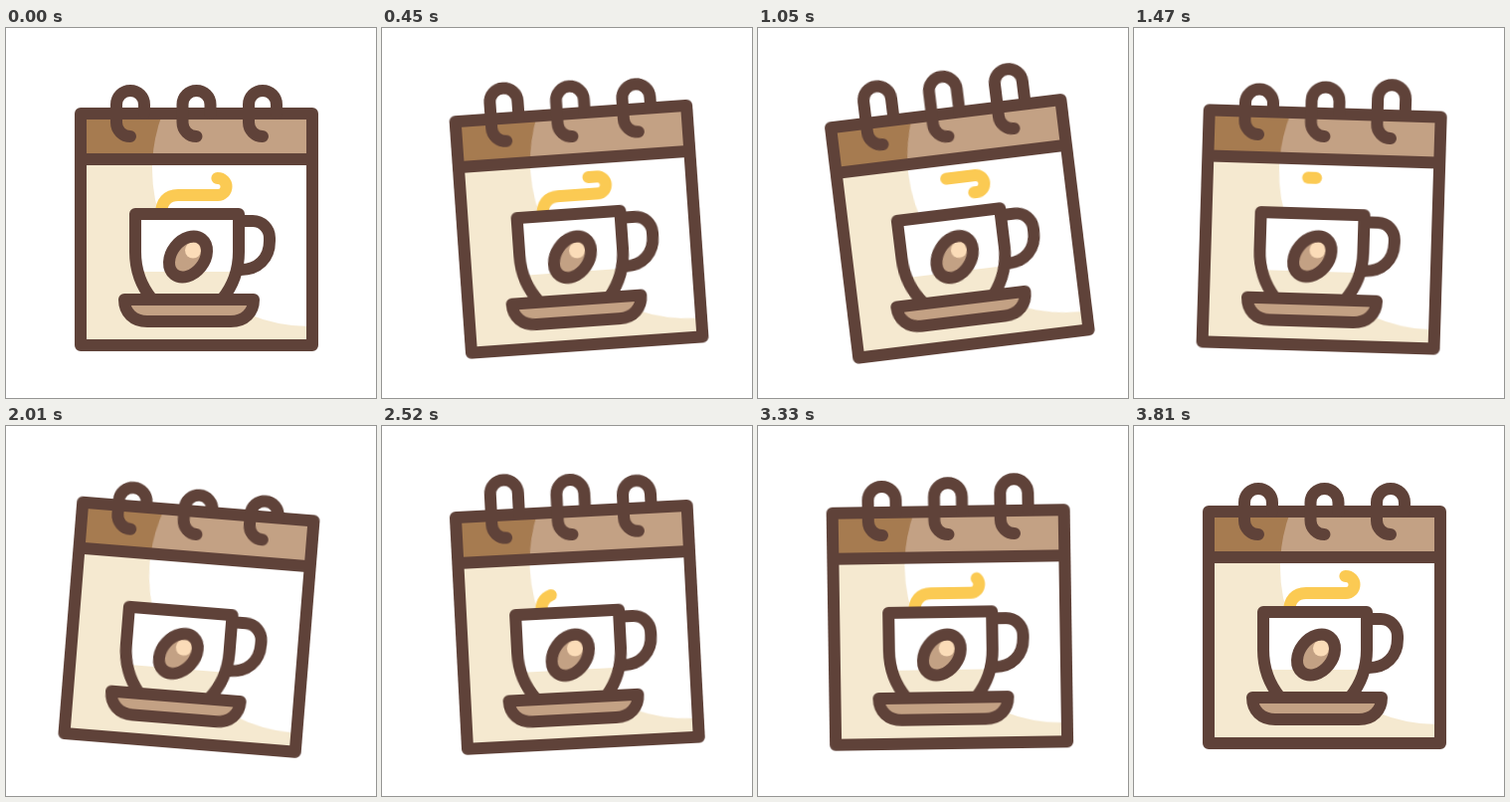
These frames come from a looping animation (372x372 px, 3930 ms). An HTML page without scripts:

```html
<!DOCTYPE html>
<html lang="en">
<head>
<meta charset="utf-8">
<title>Coffee calendar</title>
<style>
  @property --tail { syntax: "<number>"; inherits: false; initial-value: 0; }
  @property --tip { syntax: "<number>"; inherits: false; initial-value: 96; }

  :root {
    --loop: 3930ms;
    --ease: cubic-bezier(.333, 0, .667, 1);
    --line: #5f4239;
    --tan: #c3a184;
    --cream: #f5e9d0;
  }
  html, body { margin: 0; width: 100%; height: 100%; overflow: hidden; background: #fff; }
  svg { display: block; width: 100%; height: 100%; }

  .line { fill: none; stroke: var(--line); stroke-width: 12; stroke-linecap: round; stroke-linejoin: round; }
  .tan { fill: var(--tan); }
  .dark { fill: #a67b50; }
  .cream { fill: var(--cream); }
  .white { fill: #fff; }
  .shine { fill: #fbdcb8; }

  /* Damped swing about the middle of the header */
  .swing { transform-origin: 191.5px 109px; animation: swing var(--loop) var(--ease) infinite; }
  @keyframes swing {
    0%, 91.603%, 100% { transform: rotate(0deg); }
    22.901% { transform: rotate(-8deg); }
    45.802% { transform: rotate(6deg); }
    68.702% { transform: rotate(-4deg); }
  }

  /* Rings stretch one after another; the hooks stay in place */
  .ring { animation: stretch var(--loop) var(--ease) infinite backwards; }
  .ring.b { animation-delay: 120ms; }
  .ring.c { animation-delay: 240ms; }
  @keyframes stretch {
    0%, 91.603%, 100% { d: path("M139 86 V77 A14 14 0 0 0 111 77 V95 A14 14 0 0 0 125 109"); }
    22.901%, 68.702% { d: path("M139 86 V62.5 A14 14 0 0 0 111 62.5 V95 A14 14 0 0 0 125 109"); }
    45.802% { d: path("M139 86 V84.2 A14 14 0 0 0 111 84.2 V95 A14 14 0 0 0 125 109"); }
  }

  /* The visible steam runs from --tail to --tip along its path */
  .steam {
    fill: none; stroke: #fbca53; stroke-width: 12; stroke-linecap: round; stroke-linejoin: round;
    stroke-dasharray: calc((var(--tip) - var(--tail)) * 1px) 300px;
    stroke-dashoffset: calc(var(--tail) * -1px);
    animation: tip var(--loop) var(--ease) infinite, tail var(--loop) var(--ease) infinite;
  }
  @keyframes tip {
    0%, 91.603%, 100% { --tip: 96; }
    38.168%, 41.985% { --tip: 132; }
    41.986%, 51.527% { --tip: 0; }
  }
  @keyframes tail {
    0%, 11.45% { --tail: 0; }
    41.985% { --tail: 132; }
    41.986%, 100% { --tail: 0; }
  }
</style>
</head>
<body>
<svg viewBox="0 0 372 372">
  <defs>
    <clipPath id="head"><rect x="75" y="86" width="233" height="46"/></clipPath>
    <clipPath id="page"><rect x="75" y="132" width="233" height="187"/></clipPath>
    <path id="bowl" d="M130 187 H234 V225 C234 245 226 262 217 273 H147 C138 262 130 245 130 225 Z"/>
    <clipPath id="inBowl"><use href="#bowl"/></clipPath>
    <ellipse id="bean" cx="183" cy="230" rx="22.5" ry="16.5" transform="rotate(-52 183 230)"/>
    <clipPath id="inBean"><use href="#bean"/></clipPath>
  </defs>

  <g class="swing">
    <g clip-path="url(#page)">
      <rect class="cream" x="75" y="132" width="233" height="187"/>
      <circle class="white" cx="305" cy="142" r="158"/>
    </g>
    <g clip-path="url(#head)">
      <rect class="dark" x="75" y="86" width="233" height="46"/>
      <circle class="tan" cx="305" cy="142" r="158"/>
    </g>
    <path class="line" d="M75 86 H308 V319 H75 Z M75 132 H308"/>

    <path class="line ring" d="M139 86 V77 A14 14 0 0 0 111 77 V95 A14 14 0 0 0 125 109"/>
    <g transform="translate(66.5 0)">
      <path class="line ring b" d="M139 86 V77 A14 14 0 0 0 111 77 V95 A14 14 0 0 0 125 109"/>
    </g>
    <g transform="translate(133 0)">
      <path class="line ring c" d="M139 86 V77 A14 14 0 0 0 111 77 V95 A14 14 0 0 0 125 109"/>
    </g>

    <path class="steam" d="M156 187 C156 175 162 168 173 168 H213 A8.5 8.5 0 0 0 213 151 H174"/>

    <path class="line" d="M234 194 H248 A17 17 0 0 1 265 211 V214 C265 232 253 243 236 243"/>
    <use class="white" href="#bowl"/>
    <rect class="cream" x="130" y="245" width="104" height="28" clip-path="url(#inBowl)"/>
    <use class="line" href="#bowl"/>

    <use class="tan" href="#bean"/>
    <circle class="shine" cx="188" cy="223.5" r="8" clip-path="url(#inBean)"/>
    <use class="line" href="#bean"/>

    <path class="line" style="fill: var(--tan)" d="M119 273 H249 C249 286 240 295 226 295 H142 C128 295 119 286 119 273 Z"/>
  </g>
</svg>
</body>
</html>
```
